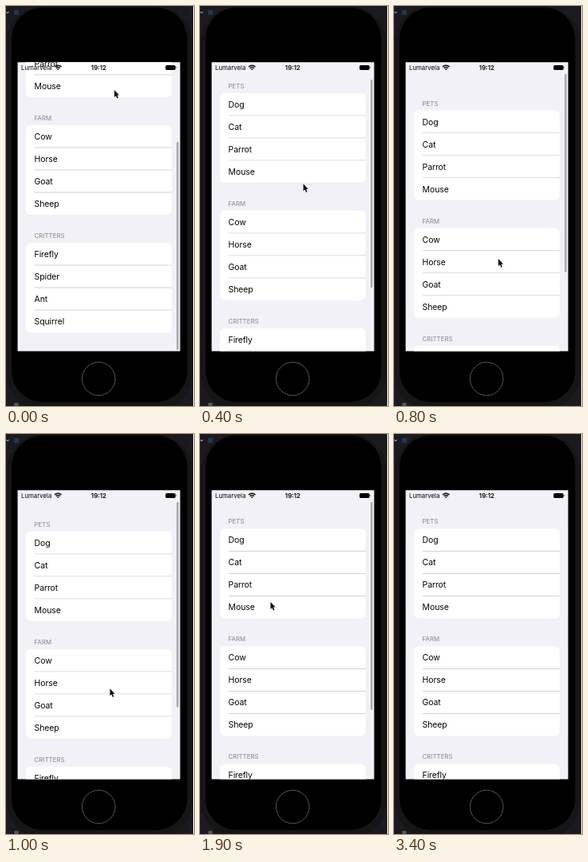
Recreate the animation shown at these times as an HTML page with a canvas. Size 236x500 px, loop 4.3 s.

```html
<!DOCTYPE html>
<html lang="en">
<head>
<meta charset="utf-8">
<title>Animal list</title>
<style>
html, body { margin: 0; width: 100%; height: 100%; overflow: hidden; background: #1a1a20; }
canvas { display: block; width: 236px; height: 500px; }
</style>
</head>
<body>
<canvas id="stage"></canvas>
<script>
const W = 236, H = 500, LOOP = 4300, STEP = 100;
const REST = 109, LOWEST = -7.5, RELEASE = 600;
const INK = "#050505", FONT = 'Inter, "Liberation Sans", sans-serif';
const GROUPS = [
  ["PETS", "Dog", "Cat", "Parrot", "Mouse"],
  ["FARM", "Cow", "Horse", "Goat", "Sheep"],
  ["CRITTERS", "Firefly", "Spider", "Ant", "Squirrel"]
];

const linear = k => k;
const easeOut = k => 1 - (1 - k) ** 2;
const easeInOut = k => k * k * (3 - 2 * k);

const START = { x: 136, y: 105 };
const MOVES = [
  { from: 0, to: RELEASE, x: 126.5, y: 281, ease: linear },
  { from: RELEASE, to: 900, x: 131.5, y: 320.5, ease: easeOut },
  { from: 960, to: 1400, x: 87, y: 226.5, ease: easeInOut },
  { from: 1400, to: 1900, x: 88.5, y: 210, ease: easeOut },
  { from: 2200, to: 2300, x: 96, y: 211, ease: linear }
];

const canvas = document.getElementById("stage");
const ctx = canvas.getContext("2d");
const dpr = window.devicePixelRatio || 1;
canvas.width = W * dpr;
canvas.height = H * dpr;

function pointerAt(t) {
  let { x, y } = START;
  for (const m of MOVES) {
    const k = m.ease(Math.min(1, Math.max(0, (t - m.from) / (m.to - m.from))));
    x += (m.x - x) * k;
    y += (m.y - y) * k;
  }
  return { x, y };
}

// Height of the first heading: drag with rubber band, then a damped spring
function listTop(t) {
  const raw = Math.max(LOWEST, pointerAt(Math.min(t, RELEASE)).y - 123);
  if (raw <= REST) return raw;
  const s = Math.max(0, t - RELEASE) * 0.00875;
  return REST + (raw - REST) * 0.52 * (1 + s) * Math.exp(-s);
}

function box(x, y, w, h, r, color) {
  ctx.beginPath();
  ctx.roundRect(x, y, w, h, r);
  ctx.fillStyle = color;
  ctx.fill();
}

function label(str, x, y, size, color, weight = 400, spacing = 0) {
  ctx.font = `${weight} ${size}px ${FONT}`;
  ctx.letterSpacing = spacing + "px";
  ctx.fillStyle = color;
  ctx.fillText(str, x, y + size * 0.364);
}

function drawPhone() {
  box(0, 0, W, H, 0, "#1a1a20");
  box(10, 5, 6, 6, 1, "#22354e");
  box(10, 496, 6, 4, 2, "#55555a");
  ctx.beginPath();
  ctx.moveTo(0.3, 7);
  ctx.lineTo(2, 9);
  ctx.lineTo(3.7, 7);
  ctx.strokeStyle = "#b5b5b8";
  ctx.lineWidth = 1;
  ctx.stroke();
  box(1, 0.5, 233, 505, 46, "#161617");
  box(7, 2, 220.5, 493, 39, "#000");
  box(235, 0, 1, H, 0, "#fff");
  ctx.beginPath();
  ctx.arc(116.3, 466, 20.8, 0, Math.PI * 2);
  ctx.strokeStyle = "#555";
  ctx.stroke();
}

function drawList(top) {
  GROUPS.forEach(([title, ...rows], g) => {
    const y = top + g * 147;
    label(title, 35.5, y + 0.5, 7.9, "#85858a");
    box(25, y + 9.4, 183, 112, 6, "#fff");
    rows.forEach((name, i) => {
      const mid = y + 23.6 + i * 28;
      label(name, 35.6, mid, 10.5, INK, 400, -0.12);
      if (i < 3) box(36, mid + 13.5, 172, 0.8, 0, "#d2d2d6");
    });
  });
}

function drawScrollbar(top, t) {
  const y = 85 + Math.max(0, REST - top) * 0.73;
  const h = 260 - Math.max(0, top - REST);
  ctx.globalAlpha = t < 3300 ? 1 : t < 3400 ? 0.45 : 0;
  box(214.2, y, 2.4, h, 1.2, "#a5a4aa");
  ctx.globalAlpha = 1;
}

function drawStatus() {
  label("Lumarvela", 19, 77.5, 7.8, INK);
  label("19:12", 106.8, 77.5, 7.9, INK, 600);
  // signal: two arcs over a filled wedge
  ctx.strokeStyle = INK;
  ctx.lineWidth = 1.5;
  for (const r of [1.2, 3.6, 6]) {
    ctx.beginPath();
    ctx.arc(65.3, 80.3, r, -Math.PI * 0.75, -Math.PI * 0.25);
    ctx.stroke();
  }
  box(200.3, 74, 12.4, 6.1, 1.6, INK);
  box(213.2, 75.8, 0.9, 2.4, 0.5, "#77777b");
}

function drawPointer({ x, y }) {
  ctx.beginPath();
  [[0, 0], [0, 9], [2, 7.2], [3.5, 10.6], [5, 9.9], [3.6, 6.6], [6.2, 6.4]]
    .forEach(([dx, dy]) => ctx.lineTo(x + dx, y + dy));
  ctx.closePath();
  ctx.lineJoin = "round";
  ctx.lineWidth = 1.2;
  ctx.strokeStyle = "#fff";
  ctx.stroke();
  ctx.fillStyle = "#111";
  ctx.fill();
}

function draw(t) {
  const top = listTop(t);
  ctx.setTransform(dpr, 0, 0, dpr, 0, 0);
  drawPhone();
  ctx.save();
  ctx.beginPath();
  ctx.rect(14.6, 70.3, 204, 361.3);
  ctx.clip();
  box(0, 60, W, 380, 0, "#f2f1f7");
  ctx.filter = `blur(${0.35 * dpr}px)`;
  drawList(top);
  drawScrollbar(top, t);
  drawStatus();
  if (t < 2400) drawPointer(pointerAt(t));
  ctx.restore();
}

const start = performance.now();
let shown = -1;
function tick() {
  const t = Math.floor(((performance.now() - start) % LOOP) / STEP) * STEP;
  if (t !== shown) draw(shown = t);
  requestAnimationFrame(tick);
}
tick();
</script>
</body>
</html>
```
